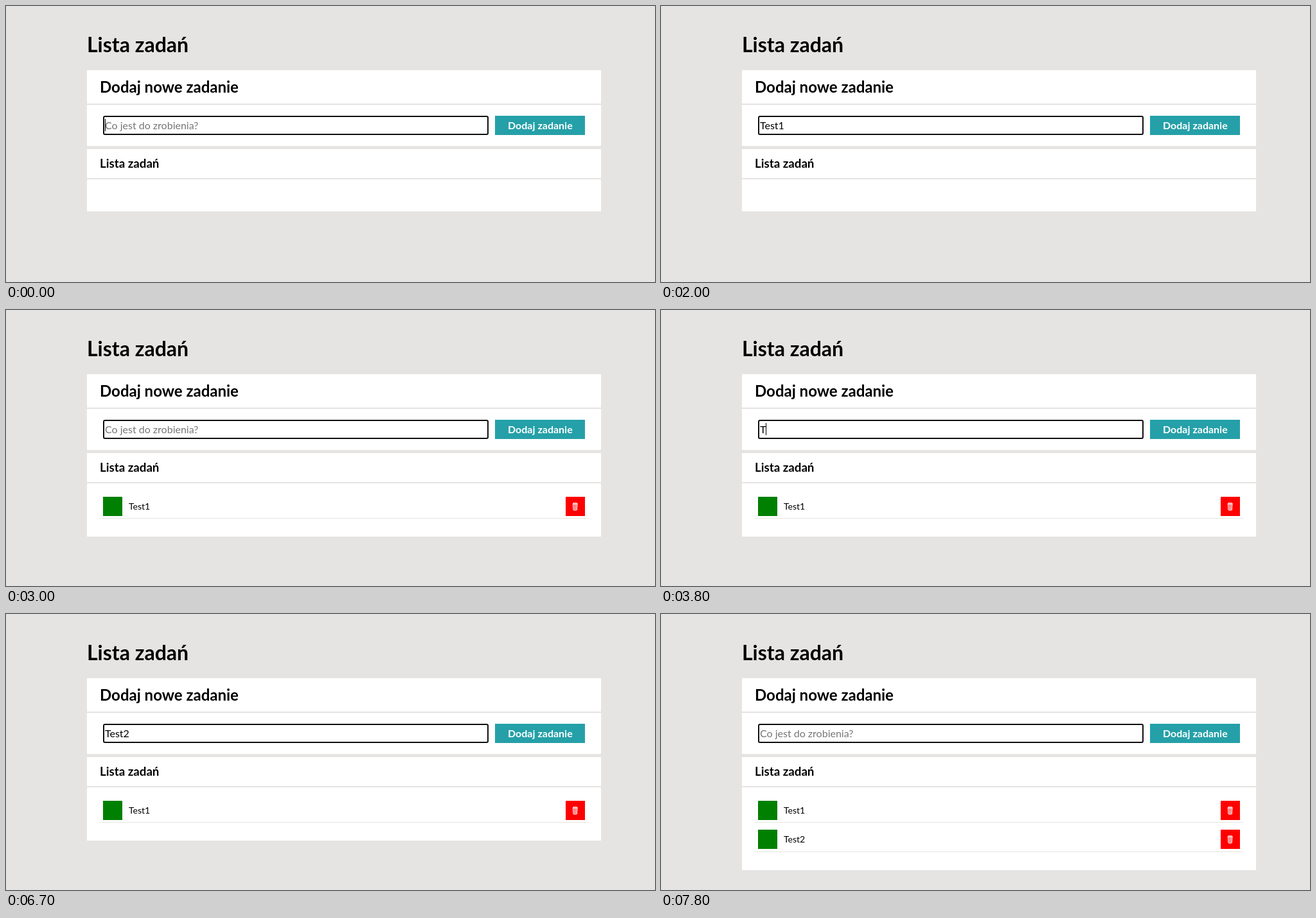
An HTML page for the animation above (8 s loop, 1010 by 430 pixels).

```html
<!DOCTYPE html>
<html lang="pl">
<head>
<meta charset="utf-8">
<title>Lista zadań</title>
<style>
  html, body { margin: 0; height: 100%; overflow: hidden; background: #e5e4e2; }
  svg { display: block; font: 16px Lato, sans-serif; }
  .bold { font-weight: 700; }
  .panel { fill: #fff; }
  .rule { fill: #e5e4e2; }
</style>
</head>
<body>
<svg width="1010" height="430" viewBox="0 0 1010 430">
  <defs>
    <g id="row">
      <rect x="151" y="291" width="30" height="30" fill="green"/>
      <rect x="871" y="291" width="30" height="30" fill="red"/>
      <g stroke="#fff" stroke-width=".8" fill="#fff" fill-opacity=".35">
        <path d="M882.2 302 L882.9 311.6 Q885.7 313.2 888.5 311.6 L889.2 302 Z"/>
        <ellipse cx="885.7" cy="301.6" rx="3.7" ry="1.2"/>
        <path d="M884.2 303.5 L884.5 311.5 M886 303.5 V311.5 M887.5 303.5 L887.2 311.5" stroke-width=".5"/>
      </g>
    </g>
  </defs>

  <text class="bold" x="126" y="72" font-size="32">Lista zadań</text>

  <rect class="panel" x="126" y="100" width="800" height="118"/>
  <rect class="rule" x="126" y="152" width="800" height="2"/>
  <text class="bold" x="146" y="135" font-size="24">Dodaj nowe zadanie</text>
  <rect x="152" y="172" width="598" height="28" rx="2" fill="#fff" stroke="#101010" stroke-width="2"/>
  <text id="field" x="154" y="192"></text>
  <rect id="caret" y="176" width="1" height="19"/>
  <rect x="761" y="171" width="140" height="30" fill="#25a0a8"/>
  <text class="bold" x="781" y="192" fill="#fff">Dodaj zadanie</text>

  <rect id="list" class="panel" x="126" y="223" width="800" height="97"/>
  <rect class="rule" x="126" y="268" width="800" height="2"/>
  <text class="bold" x="146" y="252" font-size="18.72">Lista zadań</text>
  <g class="item" font-size="14">
    <use href="#row"/>
    <text x="191" y="311">Test1</text>
    <rect class="rule" x="146" y="324" width="760" height="1"/>
  </g>
  <g class="item" font-size="14">
    <use href="#row" y="45"/>
    <text x="191" y="356">Test2</text>
    <rect class="rule" x="146" y="370" width="760" height="1"/>
  </g>
</svg>
<script>
  const LOOP = 8000, BLINK = 500;
  const field = document.getElementById('field');
  const caret = document.getElementById('caret');
  const list = document.getElementById('list');
  const items = document.querySelectorAll('.item');
  const bottoms = [320, 353, 399];

  // [time, typed text, tasks in the list]
  const edits = [
    [0, '', 0], [100, 'T', 0], [300, 'Te', 0], [500, 'Tes', 0], [900, 'Test', 0], [1500, 'Test1', 0],
    [2300, '', 1], [3800, 'T', 1], [4100, 'Te', 1], [4700, 'Tes', 1], [4900, 'Test', 1], [6200, 'Test2', 1],
    [6800, '', 2]
  ];
  // Typing restarts the blink; submitting keeps its running phase.
  const blinkStart = (time, text, count) => text || !count ? time : count === 1 ? 1500 : 6300;

  function draw(now) {
    const t = now % LOOP;
    const [time, text, count] = edits.findLast(edit => edit[0] <= t);
    field.textContent = text || 'Co jest do zrobienia?';
    field.setAttribute('fill', text ? '#000' : '#757575');
    const width = text ? field.getComputedTextLength() : 0;
    caret.setAttribute('x', 154 + Math.floor(width));
    const phase = Math.floor((t - blinkStart(time, text, count)) / BLINK);
    caret.style.display = phase % 2 ? 'none' : '';
    list.setAttribute('height', bottoms[count] - 223);
    items.forEach((item, i) => item.style.display = i < count ? '' : 'none');
  }

  function tick() {
    draw(performance.now());
    requestAnimationFrame(tick);
  }
  tick();
</script>
</body>
</html>
```
